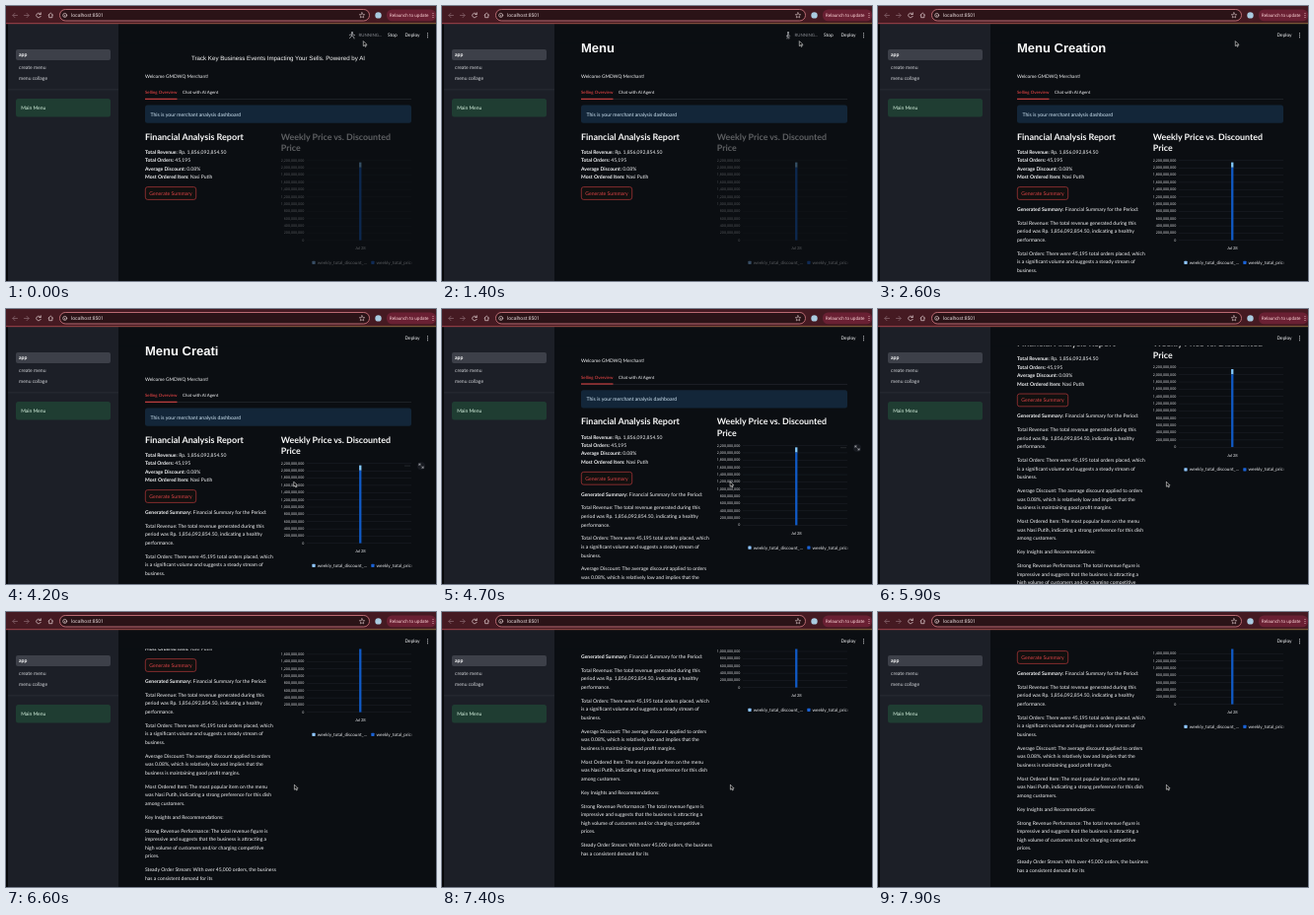
An HTML page that plays this animation: 436 px wide and 279 px high, repeating every 8000 ms.

```html
<!DOCTYPE html>
<html lang="en">
<head>
<meta charset="utf-8">
<title>Merchant dashboard</title>
<style>
html, body { margin: 0; width: 100%; height: 100%; overflow: hidden; background: #0b0e12; }
svg { display: block; width: 436px; height: 279px; font-family: Lato, sans-serif; text-rendering: geometricPrecision; }
.b { font-weight: 700; }
.ui { font-family: Roboto, sans-serif; }
.axis { font-family: "Open Sans", sans-serif; }
.title { font-family: "Liberation Sans", Arial, sans-serif; }
.line { fill: none; stroke-width: .8; stroke-linecap: round; stroke-linejoin: round; }
</style>
</head>
<body>
<svg id="stage" viewBox="0 0 436 279"></svg>
<script>
const LOOP = 8000, DONE = 2300, TITLE = "Menu Creation";

// y is the vertical middle of the capitals
const text = (x, y, size, str, fill = "#f6f7f9", attrs = "") =>
  `<text x="${x}" y="${y + size * 0.36}" font-size="${size}" fill="${fill}" ${attrs}>${str}</text>`;
const rect = (x, y, w, h, fill, attrs = "") =>
  `<rect x="${x}" y="${y}" width="${w}" height="${h}" fill="${fill}" ${attrs}/>`;
const line = (d, stroke, attrs = "") => `<path class="line" d="${d}" stroke="${stroke}" ${attrs}/>`;
const dots = (pts, r, fill) => pts.map(([x, y]) => `<circle cx="${x}" cy="${y}" r="${r}" fill="${fill}"/>`).join("");
const bold = s => `<tspan class="b">${s}</tspan>`;

const toolbar = () =>
  rect(0, 0, 436, 18, "#451a22") + rect(0, 17.2, 436, 1, "url(#rim)") +
  line("M11.5 9.5H7M9 7.3L6.8 9.5L9 11.7M18.5 9.5H23M21 7.3L23.2 9.5L21 11.7", "#85636a") +
  line("M35 8.2A2.3 2.3 0 1 0 35.2 10.4M35.3 6.8V8.5H33.6M43 9.2L45.3 7.1L47.6 9.2M43.7 9V11.7H46.9V9", "#d5bfc2") +
  rect(54.5, 3.5, 314, 11.5, "#2b1317", 'rx="5.7" stroke="#b96a72" stroke-width="1"') +
  `<circle class="line" cx="59.7" cy="9.4" r="2" stroke="#cbb6b8"/>` +
  line("M59.7 9.3V10.3", "#cbb6b8") +
  text(66, 9.4, 5, "localhost:8501", "#e6dadb", 'class="ui"') +
  line("M361 6.7L361.8 8.5L363.7 8.7L362.3 10L362.7 11.9L361 10.9L359.3 11.9L359.7 10L358.3 8.7L360.2 8.5Z", "#d5bfc2", 'style="stroke-width:.6"') +
  `<circle cx="377.5" cy="9.4" r="3.2" fill="#a9cbe0"/>` +
  rect(386, 3.5, 50, 11.8, "#6a2033", 'rx="5.5"') +
  text(388.8, 9.4, 4.65, "Relaunch to update", "#f6cdd1", 'class="ui"') +
  dots([[433, 7.4], [433, 9.4], [433, 11.4]], 0.5, "#f6cdd1");

const sidebar = () =>
  rect(0, 18, 2, 261, "#07080a") + rect(2, 18, 112, 261, "#1c1f27") +
  rect(10, 44, 96, 11, "#3d4049", 'rx="2"') +
  text(13, 49.3, 5.05, "app", "#fff", 'class="b"') +
  text(13, 61.9, 5.05, "create menu", "#d2d4d8") +
  text(13, 73.6, 5.05, "menu collage", "#d2d4d8") +
  rect(2, 84.6, 112, 0.6, "#30333c") +
  rect(10, 94, 96, 18.5, "#1f3d32", 'rx="2.5"') +
  text(15.2, 103.4, 5, "Main Menu", "#dcf8e5");

const header = () =>
  rect(114, 18, 322, 19.5, "#0b0e12") +
  text(404.5, 29.7, 4.8, "Deploy") +
  dots([[427.5, 27.7], [427.5, 29.7], [427.5, 31.7]], 0.55, "#f2f3f5") +
  `<g id="running">${text(357.5, 29.7, 4.4, "RUNNING...", "#8a8d93")}${text(387, 29.7, 4.8, "Stop")}
   <circle cx="351" cy="27" r="1" fill="#a6a8ad"/>${line("", "#a6a8ad", 'id="runner"')}</g>`;

const chart = () => {
  let s = "";
  for (let i = 0; i < 12; i++) {
    const y = 237.6 - i * 7.36;
    s += rect(305, y, 106, 0.4, "#22272f") +
      text(302.3, y - 0.2, 3.65, (i * 2e8).toLocaleString("en-US"), "#e6e7ea", 'class="axis" text-anchor="end"');
  }
  return text(278.8, 132.4, 8.85, "Weekly Price vs. Discounted", "#fafafa", 'class="b"') +
    text(278.8, 143.9, 8.85, "Price", "#fafafa", 'class="b"') + s +
    rect(358.1, 158.6, 2.3, 5.2, "#83c9ff") + rect(358.1, 163.8, 2.3, 73.8, "#1059c4") +
    text(359.4, 246, 4.1, "Jul 28", "#e6e7ea", 'text-anchor="middle"') +
    rect(310.4, 258.8, 3.2, 3.2, "#8fc6ff", 'rx=".4"') + text(315.8, 260.2, 4.6, "weekly_total_discount_...", "#e6e7ea") +
    rect(370.3, 258.8, 3.2, 3.2, "#1a62d6", 'rx=".4"') +
    `<g clip-path="url(#edge)">${text(375.5, 260.2, 4.6, "weekly_total_price", "#e6e7ea")}</g>`;
};

const summary = () => {
  const paras = [
    [bold("Generated Summary:") + " Financial Summary for the Period:"],
    ["Total Revenue: The total revenue generated during this", "period was Rp. 1,856,092,854.50, indicating a healthy", "performance."],
    ["Total Orders: There were 45,195 total orders placed, which", "is a significant volume and suggests a steady stream of", "business."],
    ["Average Discount: The average discount applied to orders", "was 0.08%, which is relatively low and implies that the", "business is maintaining good profit margins."],
    ["Most Ordered Item: The most popular item on the menu", "was Nasi Putih, indicating a strong preference for this dish", "among customers."],
    ["Key Insights and Recommendations:"],
    ["Strong Revenue Performance: The total revenue figure is", "impressive and suggests that the business is attracting a", "high volume of customers and/or charging competitive", "prices."],
    ["Steady Order Stream: With over 45,000 orders, the business", "has a consistent demand for its"]
  ];
  let y = 206, s = "";
  for (const p of paras) {
    p.forEach((str, i) => s += text(141, y + i * 8.55, 5.05, str));
    y += (p.length - 1) * 8.55 + 13.9;
  }
  return s;
};

const facts = [["Total Revenue:", "Rp. 1,856,092,854.50"], ["Total Orders:", "45,195"],
  ["Average Discount:", "0.08%"], ["Most Ordered Item:", "Nasi Putih"]];

const page = () =>
  text(276, 52.8, 6.2, "Track Key Business Events Impacting Your Sells. Powered by AI", "#fafafa", 'id="tagline" class="title" text-anchor="middle"') +
  text(141, 42, 13, "", "#fafafa", 'id="heading" class="title b"') +
  text(141, 71, 4.8, "Welcome GMDWQ Merchant!") +
  text(141, 87.4, 4.4, "Selling Overview", "#ff4b4b") + text(179, 87.4, 4.4, "Chat with AI Agent") +
  rect(141, 94.2, 270, 0.6, "#2a2d35") + rect(141, 93.8, 32.5, 0.9, "#ff4b4b") +
  rect(141, 100.5, 270, 18.3, "#132639", 'rx="2.5"') +
  text(146.5, 109.7, 5.15, "This is your merchant analysis dashboard", "#d3e9f8") +
  text(141, 132.4, 9, "Financial Analysis Report", "#fafafa", 'class="b"') +
  facts.map(([k, v], i) => text(141, 148 + i * 8.45, 5.05, bold(k) + " " + v)).join("") +
  rect(141.3, 183.6, 51.4, 12.8, "#11100f", 'rx="2.3" stroke="#b5383c" stroke-width=".7"') +
  text(167, 189.9, 5.15, "Generate Summary", "#de4447", 'text-anchor="middle"') +
  `<g id="summary">${summary()}</g><g id="chart">${chart()}</g>` +
  `<g id="tools">${dots([[405, 159], [407, 159], [409, 159]], 0.4, "#7c7f86")}
   <circle cx="421" cy="159.2" r="4" fill="#171a20"/>
   ${line("M418.9 158.6V157.2H420.3M418.9 157.2L420.2 158.5M423.1 159.8V161.2H421.7M423.1 161.2L421.8 159.9", "#c3c5c9", 'style="stroke-width:.6"')}</g>`;

const stage = document.getElementById("stage");
stage.innerHTML = `<clipPath id="edge"><rect x="300" y="250" width="111.3" height="20"/></clipPath>
  <linearGradient id="rim"><stop stop-color="#a0424b"/><stop offset="1" stop-color="#86683c"/></linearGradient>` +
  rect(0, 0, 436, 279, "#0b0e12") + `<g id="page">${page()}</g>` + header() + sidebar() + toolbar() +
  `<path id="cursor" d="M0 0V5L1.2 4L2 5.8L2.9 5.4L2.1 3.7H3.7Z" fill="#000" stroke="#fff" stroke-width=".55"/>`;

const $ = id => document.getElementById(id);
const show = (id, on) => $(id).setAttribute("visibility", on ? "visible" : "hidden");
const clamp = (v, lo, hi) => Math.min(hi, Math.max(lo, v));

// keys: [time, ...values], eased between neighbours
function track(keys, t) {
  const i = keys.findIndex(k => k[0] > t);
  if (i === 0) return keys[0].slice(1);
  if (i < 0) return keys[keys.length - 1].slice(1);
  const a = keys[i - 1], b = keys[i], u = (t - a[0]) / (b[0] - a[0]), e = u * u * (3 - 2 * u);
  return a.slice(1).map((v, j) => v + (b[j + 1] - v) * e);
}

const scrollKeys = [[4400, 0], [5400, 84], [5600, 84], [6500, 136], [6650, 136], [7000, 161], [7450, 161], [7850, 144]];
const cursorKeys = [[2800, 362.3, 35.6], [3800, 291.8, 175.2], [4400, 291.8, 175.2], [5000, 292.4, 175.2]];
const poses = ["M351 28.3L350.4 30.4L348.5 32.7M350.4 30.4L352.6 31.2L353 33M348.3 29.4L351 28.6L353.6 29.6",
  "M351 28.3L350.6 30.4L350 33M350.6 30.4L352 31.6L351.8 33M349.4 30.6L351 28.6L352.6 30.4"];

function draw() {
  const t = performance.now() % LOOP, [scroll] = track(scrollKeys, t), [x, y] = track(cursorKeys, t);
  const typed = t < 4000 ? Math.floor((t - 1000) / 100) : 13 - Math.floor((t - 4000) / 100);
  $("heading").textContent = TITLE.slice(0, clamp(typed, 0, 13));
  show("tagline", t < 1000);
  show("running", t < DONE);
  show("summary", t >= DONE);
  show("tools", t > 3700 && scroll < 88);
  $("runner").setAttribute("d", poses[Math.floor(t / 200) % 2]);
  $("chart").setAttribute("opacity", t < DONE ? 0.34 : clamp(0.34 + (t - DONE) / 300, 0, 1));
  $("page").setAttribute("transform", `translate(0 ${-scroll})`);
  $("cursor").setAttribute("transform", `translate(${x} ${y})`);
  requestAnimationFrame(draw);
}
draw();
</script>
</body>
</html>
```
